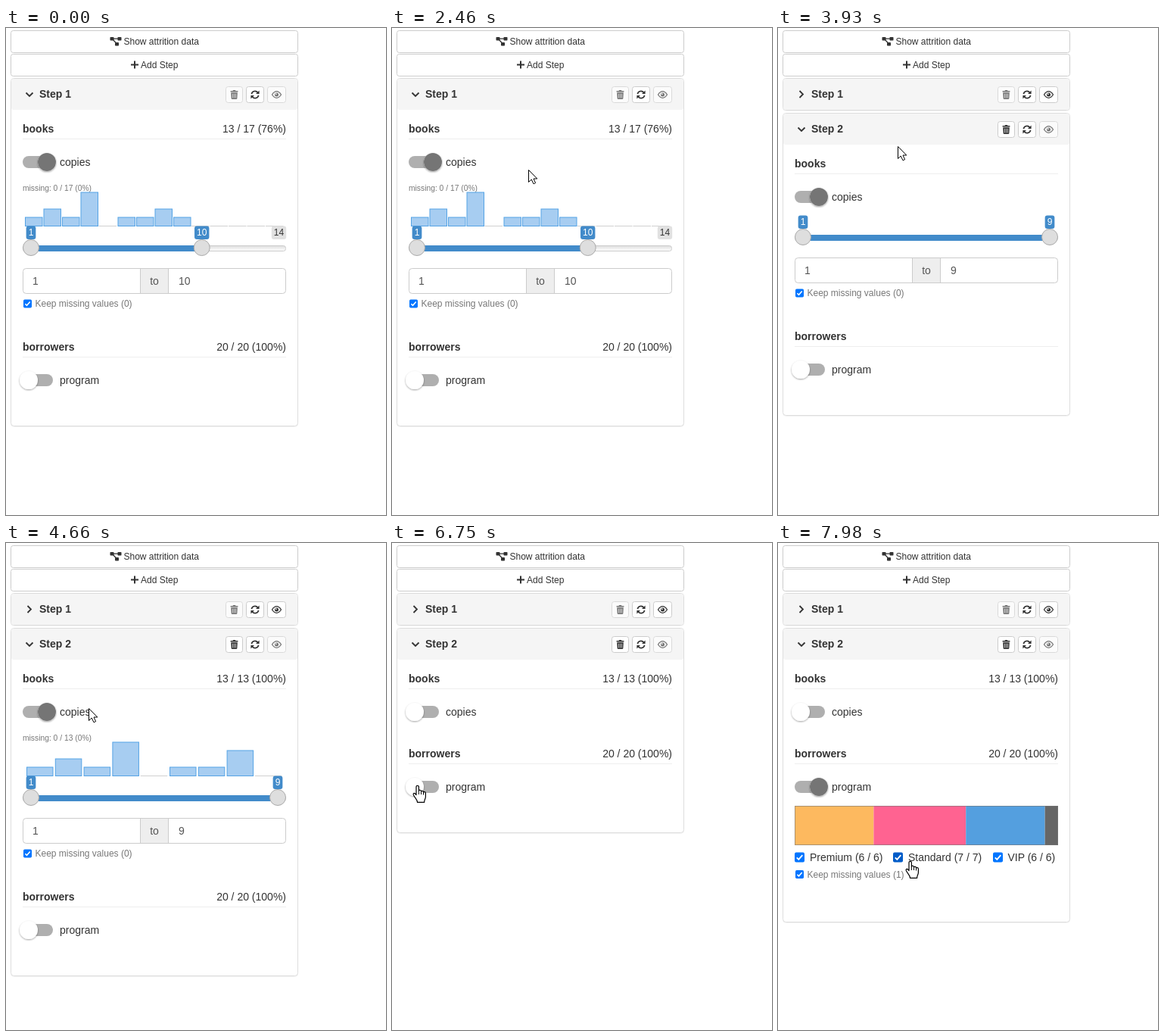
These frames come from a looping animation (502x643 px, 8 s). An HTML page:

```html
<!DOCTYPE html>
<html lang="en">
<head>
<meta charset="utf-8">
<title>Cohort steps</title>
<style>
html, body { margin: 0; width: 100%; height: 100%; overflow: hidden; background: #fff; }
svg { display: block; width: 502px; height: 643px; }
text { font: 14px "Liberation Sans", Arial, sans-serif; fill: #333; white-space: pre; }
.b { font-weight: bold; }
.s { font-size: 12px; }
.m { font-size: 10.3px; fill: #777; }
.g { fill: #777; }
.v { fill: #555; }
.w { fill: #fff; }
</style>
</head>
<body>
<svg viewBox="0 0 502 643">
  <defs>
    <filter id="shade" x="-30%" y="-30%" width="160%" height="160%">
      <feDropShadow dx="0" dy="1" stdDeviation="1.3" flood-opacity=".38"/>
    </filter>
    <linearGradient id="rail" x2="0" y2="1">
      <stop stop-color="#dedede"/><stop offset="1" stop-color="#fff"/>
    </linearGradient>
  </defs>
  <g id="page"></g>
  <g id="mouse"></g>
</svg>
<script>
const LOOP = 8000;
const page = document.getElementById('page');
const mouse = document.getElementById('mouse');

// Repaint runs: first time, last time, number of steps
const RUNS = [
  [770, 1530, 11], [2460, 2600, 3], [2780, 3250, 7], [3470, 3550, 2],
  [3700, 3930, 4], [4040, 4500, 7], [4570, 5120, 8], [5270, 5680, 6],
  [5760, 6050, 5], [6130, 6750, 9], [6830, 6900, 2], [6980, 7130, 3],
  [7290, 7290, 1], [7770, 7980, 4]
];
const TICKS = [0];
for (const [a, b, n] of RUNS)
  for (let i = 0; i < n; i++) TICKS.push(n > 1 ? a + (b - a) * i / (n - 1) : a);

// Pointer path: time, x, y
const PATH = [
  [770, 476, 624], [1150, 292, 384], [1530, 186, 236], [2460, 180, 187],
  [2600, 160, 115], [2780, 159, 86], [2940, 161, 60], [3250, 161, 52],
  [3700, 161, 52], [3930, 158, 156], [4500, 124, 210], [5120, 62, 244],
  [5680, 41, 238], [5830, 38, 222], [6130, 37, 226], [6750, 33, 320],
  [7700, 33, 320], [7980, 174, 420]
];
const HAND = [[2850, 3760], [5800, 6150], [6600, 7800], [7975, LOOP]];

const within = (t, a, b) => t >= a && t < b;
const ramp = (t, a, b) => Math.min(1, Math.max(0, (t - a) / (b - a)));

const rect = (x, y, w, h, fill, stroke = 'none', r = 0) =>
  `<rect x="${x}" y="${y}" width="${w}" height="${h}" rx="${r}" fill="${fill}" stroke="${stroke}"/>`;
const line = (d, color, width = 1) =>
  `<path d="${d}" fill="none" stroke="${color}" stroke-width="${width}"/>`;
const text = (x, y, str, cls = '', anchor = 'start') =>
  `<text x="${x}" y="${y}" class="${cls}" text-anchor="${anchor}">${str}</text>`;
const at = (x, y, body, opacity = 1) =>
  `<g transform="translate(${x} ${y})" opacity="${opacity}">${body}</g>`;

const INK = '#333';
const ICONS = {
  trash: rect(-5, -5, 10, 1.6, INK, 'none', .6) + rect(-1.8, -6, 3.6, 1.4, INK, 'none', .5) +
    `<path d="M-4.3 -2.7H4.3L3.8 5Q3.7 6 2.7 6H-2.7Q-3.7 6 -3.8 5Z" fill="${INK}"/>` +
    line('M-2 -1.2V4.5M0 -1.2V4.5M2 -1.2V4.5', '#fff', .7),
  sync: line('M-4.6 -.8A4.6 4.6 0 0 1 3.6 -2.8M4.6 .8A4.6 4.6 0 0 1 -3.6 2.8', INK, 1.7) +
    `<path d="M5.6 -5.6V-1H1ZM-5.6 5.6V1H-1Z" fill="${INK}"/>`,
  eye: line('M-6 0Q-3.2 -4.3 0 -4.3T6 0Q3.2 4.3 0 4.3T-6 0Z', INK, 1.3) +
    `<circle r="2.5" fill="${INK}"/><circle cx="-.8" cy="-.8" r=".9" fill="#fff"/>`,
  down: line('M-4.5 -2L0 2.5L4.5 -2', INK, 1.8),
  right: line('M-2.5 -4.5L2 0L-2.5 4.5', INK, 1.8),
  plus: line('M-5 0H5M0 -5V5', INK, 2),
  tree: rect(-7.5, -5.5, 5, 4.5, INK, 'none', .8) + rect(2.5, -5.5, 5, 4.5, INK, 'none', .8) +
    rect(-1, 1.5, 5, 4.5, INK, 'none', .8) + line('M-4 -3.3H4M-4 -2.5L1 3', INK, 1.3)
};

function wideButton(y, icon, ix, tx, label, fill = '#fff', edge = '#ccc') {
  return rect(6.5, y + .5, 379, 29, fill, edge, 3) +
    at(ix, y + 14.5, ICONS[icon]) + text(tx, y + 19, label, 's');
}

function toolButton(x, y, w, icon, enabled) {
  return at(x, y, rect(.5, .5, w, 21, '#fff', '#ccc', 3) +
    at(w / 2 + .5, 11, ICONS[icon]), enabled ? 1 : .65);
}

function panel(y, bottom, title, open, canDelete) {
  return rect(6.5, y + 1.5, 379, bottom - y - 1, 'none', '#f2f2f2', 4) +
    rect(6.5, y + .5, 379, bottom - y - 1, '#fff', '#ddd', 4) +
    rect(7, y + 1, 378, 41, '#f5f5f5', 'none', 3) +
    at(31, y + 21.5, ICONS[open ? 'down' : 'right']) +
    text(44, y + 26, title, 'b') +
    toolButton(290, y + 11, 22, 'trash', canDelete) +
    toolButton(317, y + 11, 23, 'sync', true) +
    toolButton(345, y + 11, 24, 'eye', !open);
}

function heading(y, name, count) {
  return text(22, y + 5, name, 'b') + text(370, y + 5, count, '', 'end') +
    line(`M22 ${y + 13.5}H370`, '#eee');
}

function toggle(y, label, on) {
  const x = 30 + 24 * on;
  const knob = (fill, o) => `<circle cx="${x}" cy="${y}" r="12" fill="${fill}" opacity="${o}"/>`;
  return rect(22, y - 8, 40, 16, '#afafaf', 'none', 8) +
    `<g filter="url(#shade)">${knob('#fff', 1)}${knob('#757575', on)}</g>` +
    text(71, y + 5, label);
}

function check(x, y, size, fill = '#0075ff') {
  const k = size / 13;
  return `<g transform="translate(${x} ${y}) scale(${k})">` + rect(0, 0, 13, 13, fill, 'none', 2) +
    line('M2.8 6.8L5.3 9.3L10.3 3.6', '#fff', 1.9) + '</g>';
}

function keepMissing(y, n) {
  return check(23, y - 5.5, 11) + text(38.5, y + 4, `Keep missing values (${n})`, 's g');
}

function histogram(counts, x, base, pitch, width) {
  return counts.map((n, i) => {
    const left = x + i * pitch, h = n * 11 + .5;
    return n ? rect(left, base - h, width, h, '#a7cdf1', '#55a3e5')
             : line(`M${left - 1} ${base}h${width + 1}`, '#d0d0d0');
  }).join('');
}

function tag(cx, y, value, fill = '#428bca', cls = 's w') {
  const w = String(value).length * 6.7 + 6;
  return rect(cx - w / 2, y - 8.5, w, 17.5, fill, 'none', 3) + text(cx, y + 4, value, cls, 'middle');
}

// Slider, inputs and checkbox; y is the centre of the value tags
function range(y, lo, hi, max) {
  const end = 33 + 326 * (hi - lo) / (max - lo);
  const c = y + 20;
  const handle = x => `<circle cx="${x}" cy="${c}" r="10.5" fill="#dedede" stroke="#aaa"/>`;
  return (hi < max ? tag(360.5, y, max, '#e1e1e1', 's') : '') +
    rect(22.5, c - 2.5, 347, 7, 'url(#rail)', '#ccc', 3) +
    rect(33, c - 3, end - 33, 8, '#428bca') +
    handle(33) + handle(end) + tag(33, y, lo) + tag(end, y, hi) +
    rect(22.5, y + 47.5, 347, 33, '#fff', '#ccc', 4) +
    rect(177.5, y + 47.5, 37, 33, '#eee', '#ccc') +
    text(35, y + 69, lo, 'v') + text(196, y + 69, 'to', 'v', 'middle') + text(228, y + 69, hi, 'v') +
    keepMissing(y + 94, 0);
}

function stackedBar(y) {
  let x = 22;
  const parts = [[6, '#fdb95f'], [7, '#ff6391'], [6, '#549fdf'], [1, '#666']];
  return parts.map(([n, color]) => {
    const w = n * 17.4, bar = rect(x, y, w, 52, color);
    x += w;
    return bar;
  }).join('') + rect(22.5, y + .5, 347, 51, 'none', '#77777799');
}

function choices(y, hover) {
  const items = [[22, 42, 'Premium (6 / 6)'], [152, 172, 'Standard (7 / 7)'], [284, 303.5, 'VIP (6 / 6)']];
  return items.map(([bx, tx, label], i) =>
    check(bx, y - 6.5, 13, hover && i === 1 ? '#005cc8' : undefined) + text(tx, y + 5, label)).join('');
}

function drawPage(t) {
  const second = t >= 3700, loaded = !second || t >= 4100;
  const copies = 1 - ramp(t, 5830, 6050), showCopies = t < 5960;
  const program = ramp(t, 6900, 7130), showProgram = t >= 7050, plotted = t >= 7290;

  const top = second ? 112 : 66;
  const books = top + 67, sw = books + 44;
  const gap = loaded ? 0 : -60;
  const people = sw + (showCopies ? 244 + gap : 55), psw = people + 44;
  const bar = plotted ? 0 : -58;
  const bottom = psw + (showProgram ? 179 + bar : 61);

  const pressed = within(t, 3470, 3550), hover = within(t, 2850, 3760);
  let out = wideButton(3, 'tree', 145, 155.5, 'Show attrition data') +
    wideButton(34, 'plus', 170, 178, 'Add Step',
      pressed ? '#d4d4d4' : hover ? '#e6e6e6' : '#fff',
      pressed ? '#8c8c8c' : hover ? '#adadad' : '#ccc');

  if (second) out += panel(66, 109, 'Step 1', false, false);
  out += panel(top, bottom, second ? 'Step 2' : 'Step 1', true, second);
  out += heading(books, 'books', !loaded ? '' : second ? '13 / 13 (100%)' : '13 / 17 (76%)');
  out += toggle(sw, 'copies', copies);
  if (showCopies) {
    if (loaded) {
      out += text(22, sw + 38, `missing: 0 / ${second ? 13 : 17} (0%)`, 'm');
      out += second
        ? histogram([1, 2, 1, 4, 0, 1, 1, 3, 0], 27.5, sw + 84.5, 37.8, 34.5)
        : histogram([1, 2, 1, 4, 0, 1, 1, 2, 1, 0, 0, 0, 0, 0], 25.5, sw + 84.5, 24.5, 22.5);
    }
    out += range(sw + 93 + gap, 1, second ? 9 : 10, second ? 9 : 14);
  }
  out += heading(people, 'borrowers', loaded ? '20 / 20 (100%)' : '');
  out += toggle(psw, 'program', program);
  if (showProgram) {
    if (plotted) out += stackedBar(psw + 25);
    out += choices(psw + 93 + bar, t >= 7975) + keepMissing(psw + 115.5 + bar, 1);
  }
  return out;
}

const ARROW = '<path d="M.5 .5V16.5L4.2 13L7 18.8L9.6 17.6L7 12H11.8Z" fill="#fff" stroke="#000"/>';
const FINGER = '<path d="M-1 12.5V1.8C-1 0 2.4 0 2.4 1.8V7.2C2.6 5.8 5.4 5.9 5.5 7.6V8.2C5.8 6.9 8.4 7 8.5 8.7V9.2' +
  'C9 8.2 11.4 8.4 11.4 10.3V15C11.4 18 9.6 18.8 9.6 22.4H.6C.6 19.4 -2 17.6 -4.6 12.8' +
  'C-5.6 10.6 -3.6 9.6 -2.4 11Z" fill="#fff" stroke="#000" stroke-width="1.2" stroke-linejoin="round"/>' +
  line('M2.4 7V12M5.5 8V12M8.5 9V12.5', '#000', 1);

function drawMouse(t) {
  if (t < PATH[0][0]) return '';
  let i = 0;
  while (i < PATH.length - 2 && t >= PATH[i + 1][0]) i++;
  const [ta, xa, ya] = PATH[i], [tb, xb, yb] = PATH[i + 1];
  const k = ramp(t, ta, tb);
  const hand = HAND.some(([a, b]) => within(t, a, b));
  return at(Math.round(xa + (xb - xa) * k), Math.round(ya + (yb - ya) * k), hand ? FINGER : ARROW);
}

let shown = -1;
function frame() {
  const t = performance.now() % LOOP;
  let tick = 0;
  for (const s of TICKS) if (s <= t) tick = s;
  if (tick !== shown) {
    shown = tick;
    page.innerHTML = drawPage(tick);
    mouse.innerHTML = drawMouse(tick);
  }
  requestAnimationFrame(frame);
}
frame();
</script>
</body>
</html>
```
